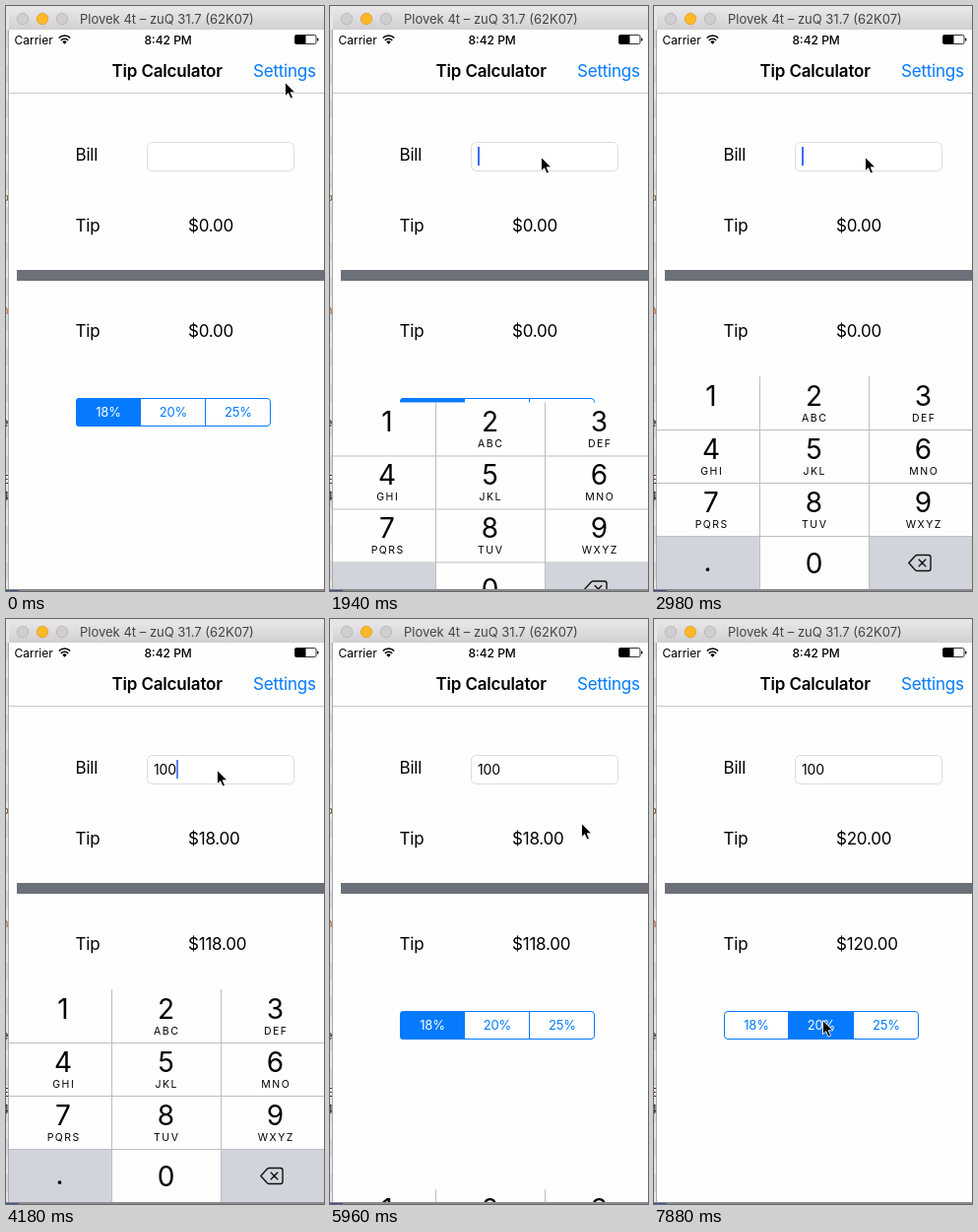
Write an HTML page that moves like this. It is 323 px wide and 594 px high and loops after 8000 ms.

```html
<!DOCTYPE html>
<html lang="en">
<head>
<meta charset="utf-8">
<title>Tip calculator</title>
<style>
  html, body { margin: 0; width: 100%; height: 100%; overflow: hidden; background: #fff; }
  svg { display: block; width: 323px; height: 594px; }
  text { font: 17px Inter, sans-serif; letter-spacing: -.013em; fill: #000; white-space: pre; }
  .title { font-weight: 600; letter-spacing: -.01em; }
  .win { font-size: 13px; letter-spacing: 0; fill: #444; }
  .status { font-size: 12px; letter-spacing: 0; }
  .clock { font-weight: 500; }
  .link { fill: #007aff; }
  .field { font-size: 14px; letter-spacing: -.01em; }
  .seg { font-size: 13px; letter-spacing: -.01em; text-anchor: middle; fill: #007aff; }
  .on { fill: #fff; }
  .digit { font-size: 28px; letter-spacing: 0; text-anchor: middle; }
  .abc { font-size: 10.5px; letter-spacing: 1.5px; text-anchor: middle; }
  .desk { font-size: 12px; letter-spacing: 0; }
</style>
</head>
<body>
<svg id="stage" viewBox="0 0 323 594" xmlns="http://www.w3.org/2000/svg"></svg>
<script>
const label = (x, y, str, cls = '', extra = '') =>
  `<text x="${x}" y="${y}" class="${cls}" ${extra}>${str}</text>`;
const rect = (x, y, w, h, fill, extra = '') =>
  `<rect x="${x}" y="${y}" width="${w}" height="${h}" fill="${fill}" ${extra}/>`;
const line = (d, color, w = 1, extra = '') =>
  `<path d="${d}" fill="none" stroke="${color}" stroke-width="${w}" ${extra}/>`;

function desktop() {
  let out = rect(0, 0, 323, 594, '#e6e6e8');
  for (let y = 24; y < 590; y += 36) out += rect(0, y, 3, 18, '#d8d8dc');
  const scraps = [[201, 'P', '#6b4a10'], [313, 'n', '#b5551c'], [427, 'e', '#222'],
                  [485, 'E', '#5a1020'], [502, '4', '#222']];
  for (const [y, s, c] of scraps) out += label(-4.5, y, s, 'desk', `style="fill:${c}"`);
  out += rect(2, 24, 1, 568, '#a9a9ad') + rect(0, 592, 323, 2, '#8e8e92');
  return out + rect(0, 593, 13, 1, '#3c4f96');
}

function windowBar() {
  const light = (x, fill, edge) =>
    `<circle cx="${x}" cy="13" r="5.7" fill="${fill}" stroke="${edge}" stroke-width=".8"/>`;
  return '<path d="M3 24V7q0-5 5-5H323V24z" fill="url(#bar)"/>' +
    light(17, '#d0ced0', '#b4b2b4') + light(37, '#fdb827', '#dfa023') + light(57, '#d0ced0', '#b4b2b4') +
    label(75, 18, 'Plovek 4t – zuQ 31.7 (62K07)', 'win');
}

function header() {
  return rect(3, 24, 320, 568, '#fefefe') +
    rect(3, 88, 320, 1, '#cbcbcd') +
    label(8.5, 38.5, 'Carrier', 'status') +
    line('M53.8 32.6a7.7 7.7 0 0 1 11.4 0M55.8 34.9a5 5 0 0 1 7.4 0', '#000', 1.5) +
    '<path d="M59.5 38.8l-2.2-2.4a3.2 3.2 0 0 1 4.4 0z"/>' +
    label(140.5, 38.5, '8:42 PM', 'status clock') +
    rect(293.5, 29.5, 21.5, 9, 'none', 'rx="1.5" stroke="#000" stroke-width=".8"') +
    rect(293.5, 29.5, 11, 9, '#000', 'rx="1"') + rect(316, 32.5, 1.4, 3, '#000', 'rx=".6"') +
    label(107.5, 72, 'Tip Calculator', 'title') +
    label(251, 72, 'Settings', 'link');
}

function form() {
  const names = ['18%', '20%', '25%'], mid = i => 104 + 66 * i;
  const shape = ['M137 398H74.5q-3.5 0-3.5 3.5v22q0 3.5 3.5 3.5h62.5z', 'M136 398h67v29h-67z'];
  return label(70.5, 157, 'Bill') + label(70.5, 229, 'Tip') + label(70.5, 336, 'Tip') +
    rect(143.5, 138.5, 149, 29, '#fff', 'rx="5" stroke="#dcdcdc"') +
    label(150, 158, '', 'field', 'id="bill"') +
    rect(150, 143, 2, 19, '#426bf2', 'id="caret"') +
    label(185, 229, '', '', 'id="tip"') + label(185, 336, '', '', 'id="total"') +
    rect(11, 268, 312, 11, '#6c7079') +
    rect(71.5, 398.5, 197, 28, '#fff', 'rx="3.5" stroke="#057aff"') +
    line('M136.5 398V427M202.5 398V427', '#057aff') +
    names.map((s, i) => label(mid(i), 417, s, 'seg')).join('') +
    shape.map((d, i) => `<g id="seg${i}"><path d="${d}" fill="#057aff"/>` +
      label(mid(i), 417, names[i], 'seg on') + '</g>').join('');
}

function keyboard() {
  const letters = ['', 'ABC', 'DEF', 'GHI', 'JKL', 'MNO', 'PQRS', 'TUV', 'WXYZ'];
  const mid = [58, 162.5, 273.5];
  let out = rect(3, 376, 320, 216, '#fefefe') +
    rect(3, 539, 104, 53, '#d1d4db') + rect(219, 539, 104, 53, '#d1d4db');
  letters.forEach((s, i) => {
    const x = mid[i % 3], y = 406 + 54 * Math.floor(i / 3);
    out += label(x, y, i + 1, 'digit') + label(x + .75, y + 15.5, s, 'abc');
  });
  out += label(54.5, 574, '.', 'digit') + label(162.5, 576, '0', 'digit');
  out += line('M107.5 376V592M218.5 376V592M3 430.5H323M3 484.5H323M3 538.5H323', '#bdbec2');
  return out + line('M258.8 565.5l6.6-7.2q.8-.8 2-.8h11.4q2.2 0 2.2 2.2v11.6q0 2.2-2.2 2.2' +
    'h-11.4q-1.2 0-2-.8zM268.8 561.7l7.4 7.6M276.2 561.7l-7.4 7.6', '#111', 1.4, 'stroke-linejoin="round"');
}

document.getElementById('stage').innerHTML = `<defs>
  <linearGradient id="bar" x2="0" y2="1"><stop stop-color="#e9e7e9"/><stop offset="1" stop-color="#d1cfd1"/></linearGradient>
  <clipPath id="screen"><path d="M3 24H323V592H3z"/></clipPath></defs>` +
  desktop() + windowBar() + header() + form() +
  `<g clip-path="url(#screen)"><g id="keys">${keyboard()}</g></g>
  <path id="cursor" d="M.5 .5V14.7l3.2-3 2.4 5.4 2.4-1-2.3-5.3h4.6z" fill="#000" stroke="#fff" stroke-width=".9" stroke-linejoin="round"/>`;

const LOOP = 8000, TICK = 148.8;
const FOCUS = 1780, LAST_KEY = 3570, BLUR = 5500, PRESS = 7580;

const clamp = v => Math.min(1, Math.max(0, v));
const between = (t, a, b) => clamp((t - a) / (b - a));

// Pointer strokes: start, end, then the four points of a Bezier curve.
const strokes = [
  [150, 1190, [283, 77], [40, -20], [-35, 75], [214, 153]],
  [5080, 5500, [214, 153], [228, 171], [241, 189], [255, 207]],
  [6400, 7430, [255, 207], [240, 265], [180, 345], [171, 407]]
];

function pointer(t) {
  const [a, b, ...p] = strokes.filter((s, i) => !i || t >= s[0]).pop();
  const u = Math.sin(between(t, a, b) * Math.PI / 2), v = 1 - u;
  return [0, 1].map(k => v ** 3 * p[0][k] + 3 * v * v * u * p[1][k] +
    3 * v * u * u * p[2][k] + u ** 3 * p[3][k]);
}

// Critically damped spring: the share of the way still to go.
function spring(t, start) {
  const x = .013 * Math.max(0, t - start);
  return (1 + x) * Math.exp(-x);
}
const keysDrop = t => 216 * (spring(t, 1655) + 1 - spring(t, 5602));

function caretAlpha(t) {
  if (t < FOCUS || t > BLUR) return 0;
  const age = t - (t < LAST_KEY ? FOCUS : LAST_KEY);
  return clamp(.5 + 5 * (Math.cos(2 * Math.PI * (age - 290) / 1040) + .35));
}

const typed = t => '100'.slice(0, Math.max(0, Math.floor((t - 3140) / 140)));

const el = id => document.getElementById(id);
const set = (id, name, value) => el(id).setAttribute(name, value);
const money = v => '$' + v.toFixed(2);

function draw(t) {
  const bill = typed(t), swap = between(t, PRESS, PRESS + 300);
  const rate = swap > .3 ? .2 : .18;
  el('bill').textContent = bill;
  el('tip').textContent = money(bill * rate);
  el('total').textContent = money(bill * (1 + rate));
  set('cursor', 'transform', `translate(${pointer(t)})`);
  set('keys', 'transform', `translate(0 ${keysDrop(t)})`);
  set('caret', 'x', 150 + (bill && el('bill').getComputedTextLength()));
  set('caret', 'opacity', caretAlpha(t));
  set('seg0', 'opacity', 1 - swap);
  set('seg1', 'opacity', t < PRESS ? 0 : .15 + .85 * swap);
}

const start = performance.now();
function tick() {
  const t = (performance.now() - start) % LOOP;
  draw(Math.floor((t + 12) / TICK) * TICK);
  requestAnimationFrame(tick);
}
tick();
</script>
</body>
</html>
```
